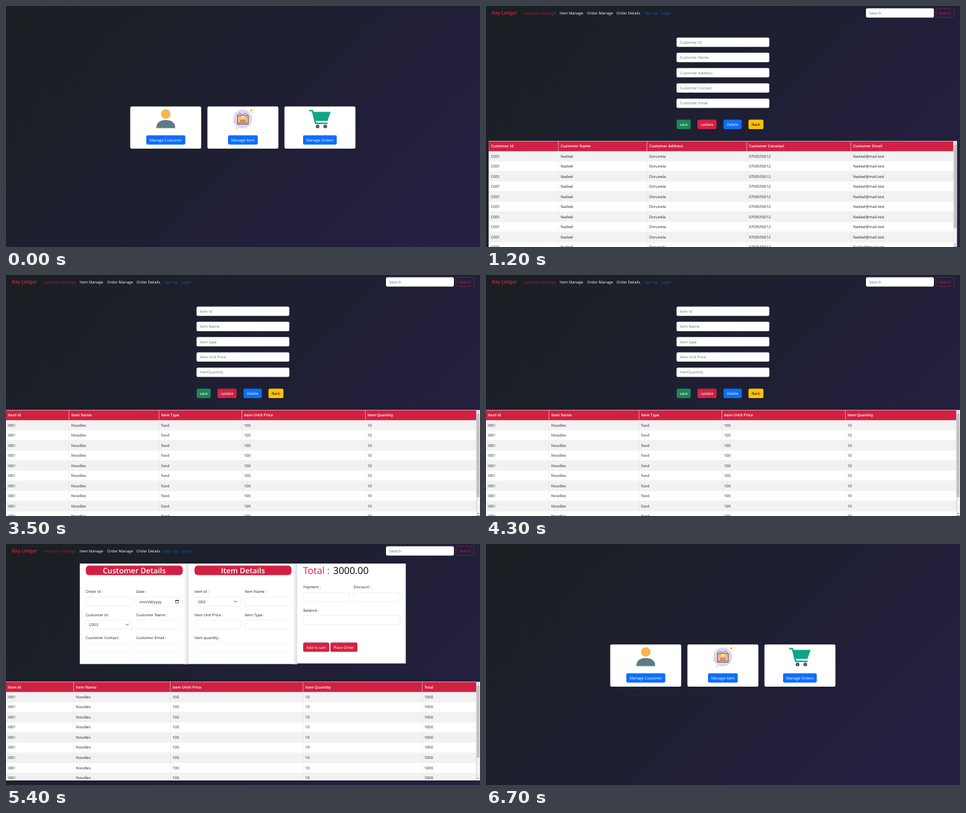
Write an HTML page that moves like this. It is 726x370 px and loops after 7.9 s.

```html
<!DOCTYPE html>
<html lang="en">
<head>
<meta charset="utf-8">
<title>Shop manager</title>
<style>
  html, body { margin: 0; width: 100%; height: 100%; overflow: hidden; }
  body { background: linear-gradient(135deg, #1a1f23 0%, #1c2029 25%, #1f1f35 55%, #261f43 100%); }
  svg { display: block; width: 726px; height: 370px; }
  text { font: 5.85px "Open Sans", "Noto Sans", sans-serif; text-rendering: geometricPrecision; white-space: pre; }
</style>
</head>
<body>
<svg id="stage" viewBox="0 0 726 370" xmlns="http://www.w3.org/2000/svg"></svg>
<script>
const LOOP = 7900;
const RED = '#d12143', BLUE = '#0d6efd', GREEN = '#198754', YELLOW = '#ffc107', GREY = '#6c757d', INK = '#212529';

const rect = (x, y, x2, y2, fill, r = 0, more = '') =>
  `<rect x="${x}" y="${y}" width="${x2 - x}" height="${y2 - y}" rx="${r}" fill="${fill}" ${more}/>`;
const text = (x, y, str, fill = INK, style = '') =>
  `<text x="${x}" y="${y}" fill="${fill}" style="${style}">${str}</text>`;
const path = (d, fill, more = '') => `<path d="${d}" fill="${fill}" ${more}/>`;
const line = (d, color, width) => path(d, 'none', `stroke="${color}" stroke-width="${width}" stroke-linecap="round" stroke-linejoin="round"`);
const dot = (x, y, r, fill) => `<circle cx="${x}" cy="${y}" r="${r}" fill="${fill}"/>`;
const group = (id, body) => `<g id="${id}">${body}</g>`;

function button(x, x2, y, label, fill, color = '#fff', id = '') {
  return rect(x, y, x2, y + 14.3, fill, 2.2, id && `id="${id}"`) +
    text((x + x2) / 2, y + 9.2, label, color, 'text-anchor:middle');
}

function home() {
  const cards = [190.3, 308.5, 426.5].map(x => rect(x, 154.2, x + 108.7, 219, '#fff', 2.2)).join('');
  const person = dot(244.7, 165.8, 7.3, '#f6b552') +
    path('M230.4 187.6V184.5C231.5 178 238 175 244.7 175S258 178 259 184.5V187.6Z', '#5d7c89');
  const parcel = dot(362.6, 173.6, 14.5, '#ddd7f4') +
    path('M354 169L357.5 164.5L362 167.5L367 164.3L371.5 169', '#fbe3c4', 'stroke="#4b3a44" stroke-width=".7"') +
    rect(354.4, 168, 371.2, 181.6, '#f2b983', .5, 'stroke="#4b3a44" stroke-width=".8"') +
    rect(360.8, 168.4, 364.8, 173, '#fbdcae') +
    rect(359.6, 175.4, 366, 179.2, '#e29b68', .3, 'stroke="#4b3a44" stroke-width=".5"') +
    line('M356 179.6H358.4M367.5 179.6H369.5', '#4b3a44', .6) +
    dot(375.6, 160.2, 1.7, '#f5b83d') + dot(377.6, 163.6, .8, '#f5b83d') +
    dot(349.4, 178.5, 1.1, '#f5b83d') + dot(353.2, 187.4, .7, '#5b4aa0') + dot(350, 163, .6, '#b9afe6');
  const cart = line('M465.3 160.7H469.4L474.2 180.2H491.6', '#10a587', 2.3) +
    path('M469.3 162.6H497.2L492.4 176.4H473Z', '#10a587') +
    [477.2, 489].map(x => dot(x, 184.9, 2.7, '#35434a') + dot(x, 184.9, .9, '#9aa5a8')).join('');
  return cards + person + parcel + cart +
    button(214.9, 274.6, 198.4, 'Manage Customer', BLUE, '#fff', 'hover') +
    button(340, 385.6, 198.4, 'Manage Item', BLUE) +
    button(455, 506.6, 198.4, 'Manage Orders', BLUE);
}

function nav() {
  const links = [[58, 'customer Manage', '#9c1e3d'], [113, 'Item Manage', '#fff'], [155, 'Order Manage', '#fff'],
    [200, 'Order Details', '#fff'], [242.3, 'Sign Up', '#1557cf'], [269, 'Login', '#1557cf']];
  return text(9, 13.2, 'Bay Ledger', '#dc2044', 'font-size:7.25px;font-weight:600') +
    links.map(([x, s, c]) => text(x, 12.8, s, c)).join('') +
    rect(582, 3.4, 686, 17.7, '#fff', 2.2) + text(587, 12.8, 'Search', GREY) +
    rect(689.2, 3.6, 716.8, 17.4, 'none', 2.2, 'stroke="#c92042" stroke-width=".5"') +
    text(703, 12.8, 'Search', '#c92042', 'text-anchor:middle');
}

function form(x, x2, fields, buttons) {
  return fields.map((s, i) => {
    const y = 48.4 + i * 23.45;
    return rect(x, y, x2, y + 14.3, '#fff', 2.2) + text(x + 4.9, y + 9.2, s, GREY);
  }).join('') + buttons.map(b => button(b[0], b[1], 174.6, ...b.slice(2))).join('');
}

// cols: [left edge, heading, cell]
function table({ id, x, x2, y, y2, thumb, cols }) {
  const pitch = 15.53, top = y + 15.6;
  let out = rect(x, y, x2, y2, '#fff');
  for (let i = 0; top + i * pitch < y2; i++) {
    const ry = top + i * pitch;
    out += rect(x, ry, x2, ry + pitch, i % 2 ? '#fff' : '#f1f2f1') +
      rect(x, ry + pitch - .4, x2, ry + pitch, '#dee2e6') +
      cols.map(c => text(c[0] + 3.3, ry + 9.6, c[2])).join('');
  }
  out += cols.slice(1).map(c => rect(c[0] - .2, top, c[0] + .2, y2, '#dee2e6')).join('');
  out += rect(x, y, x2, top, RED) + rect(x, y, x2, y + .5, '#e9dfe3') +
    cols.map((c, i) => (i ? rect(c[0] - .3, y, c[0] + .3, top, '#ecd5db') : '') +
      text(c[0] + 3.3, y + 9.9, c[1], '#fff', 'font-weight:600')).join('');
  const m = x2 + 2.8;
  out += rect(x2, y, x2 + 5.6, y2, '#f1f1f1') + rect(x2 + .7, y + 5.4, x2 + 4.9, thumb, '#c1c1c1') +
    path(`M${m - 1.3} ${y + 3.8}h2.6l-1.3 -1.5z`, '#8a8a8a') +
    path(`M${m - 1.3} ${y2 - 3.8}h2.6l-1.3 1.5z`, '#505050');
  return `<clipPath id="${id}">${rect(x, y, x2 + 5.6, y2, '#000')}</clipPath><g clip-path="url(#${id})">${out}</g>`;
}

function field(x, x2, y, label, value = '', icon = '') {
  const cy = y + 7;
  let out = text(x, y - 6.2, label) +
    rect(x, y, x2, y + 14, '#fff', 2.2, 'stroke="#dfe2e6" stroke-width=".5"') + text(x + 5, y + 9.2, value);
  if (icon === 'select') out += line(`M${x2 - 10} ${cy - 1}l2 2l2 -2`, '#343a40', .8);
  if (icon === 'date') out += rect(x2 - 10.8, cy - 2, x2 - 6.2, cy + 2.4, 'none', .3, 'stroke="#222" stroke-width=".6"') +
    rect(x2 - 11, cy - 2.4, x2 - 6, cy - 1, '#222');
  return out;
}

function orders() {
  const title = (x, s) => rect(x, 33.3, x + 148.5, 47.8, RED, 5) +
    text(x + 74.2, 44.9, s, '#fff', 'font-size:11.6px;font-weight:600;text-anchor:middle');
  const big = 'font-size:14.7px';
  return `<linearGradient id="shade"><stop stop-color="#fff"/><stop offset="1" stop-color="#dcdddd"/></linearGradient>` +
    rect(113, 30, 446, 184.3, '#fff') + rect(446, 30, 612.3, 183.4, '#fff') +
    rect(272.5, 30, 279.5, 184.3, 'url(#shade)') + rect(439, 30, 446, 184.3, 'url(#shade)') +
    title(122.2, 'Customer Details') + title(288.7, 'Item Details') +
    text(455, 46.2, 'Total :', RED, big) + text(501, 46.2, '3000.00', '#000', big) +
    field(122.3, 193.6, 81.4, 'Order Id :') + field(199.2, 270.5, 81.4, 'Date :', 'mm/dd/yyyy', 'date') +
    field(122.3, 193.6, 116.8, 'Customer Id :', 'C003', 'select') + field(199.2, 270.5, 116.8, 'Customer Name :') +
    field(122.3, 193.6, 152.2, 'Customer Contact :') + field(199.2, 270.5, 152.2, 'Customer Email :') +
    field(288.8, 359.6, 81.4, 'Item Id :', 'I003', 'select') + field(365.6, 436.9, 81.4, 'Item Name :') +
    field(288.8, 359.6, 116.8, 'Item Unit Price :') + field(365.6, 436.9, 116.8, 'Item Type :') +
    field(288.8, 436.9, 152.2, 'Item quantity :') +
    field(455.2, 526.2, 74.4, 'Payment :') + field(532.2, 603.5, 74.4, 'Discount :') +
    field(455.2, 603.5, 109.7, 'Balance :') +
    button(455.2, 495, 151.3, 'Add to cart', RED) + button(496.8, 538.2, 151.3, 'Place Order', RED) +
    table({ id: 'cart', x: 0, x2: 720.4, y: 211.6, y2: 363, thumb: 328, cols: [[-.3, 'Item Id', 'I001'],
      [103.8, 'Item Name', 'Noodles'], [251.6, 'Item Untit Price', '100'], [455, 'Item Quantity', '10'], [637.4, 'Total', '1000']] });
}

const crud = [[292, 313.5, 'save', GREEN], [323.8, 353.2, 'update', RED],
  [363.7, 391.7, 'Delete', BLUE], [402, 425, 'Back', YELLOW, '#000']];

const customers = () =>
  form(291.8, 434, ['Customer Id', 'Customer Name', 'Customer Address', 'Customer Contact', 'Customer Email'], crud) +
  table({ id: 'people', x: 4.2, x2: 715.8, y: 207.3, y2: 369.6, thumb: 341, cols: [[4.2, 'Customer Id', 'C001'],
    [110.9, 'Customer Name', 'Nadeel'], [246.7, 'Customer Address', 'Dorunela'],
    [399.4, 'Customer Conatact', '0700555012'], [558.9, 'Customer Email', 'Nadeel@mail.test']] });

const items = () =>
  form(291.8, 434, ['Item Id', 'Item Name', 'Item type', 'Item Unit Price', 'ItemQuantity'], crud) +
  table({ id: 'goods', x: 0, x2: 720.4, y: 207.3, y2: 369.6, thumb: 341, cols: [[-.3, 'Item Id', 'I001'],
    [96.6, 'Item Name', 'Noodles'], [234.2, 'Item Type', 'food'], [361.2, 'Item Untit Price', '100'],
    [550.2, 'Item Quantity', '10']] });

const details = () =>
  form(308, 417.8, ['Order Id', 'Item Id', 'Item Quantity', 'Total', 'Customer Email'],
    [[308, 337.2, 'update', RED], [347.7, 375.7, 'Delete', BLUE], [386, 408.6, 'Back', YELLOW, '#000']]) +
  table({ id: 'log', x: 4.2, x2: 715.8, y: 207.3, y2: 369.6, thumb: 316, cols: [[4.2, 'Order Id', 'O001'],
    [107, 'Item Id', 'I001'], [197, 'Item Name', 'Noodles'], [324.8, 'Item UnitPrice', '200'],
    [486.4, 'Item Quantity', '10'], [644, 'Total', '2000']] });

const scenes = { home, nav, customers, items, orders, details };
document.getElementById('stage').innerHTML =
  Object.entries(scenes).map(([id, draw]) => group(id, draw())).join('');

// steps: [time in ms, value], each held until the next
function play(id, prop, steps) {
  const frames = steps.map(([t, v]) => ({ offset: t / LOOP, [prop]: v, easing: 'steps(1, end)' }));
  frames.push({ offset: 1, [prop]: steps[steps.length - 1][1] });
  document.getElementById(id).animate(frames, { duration: LOOP, iterations: Infinity }).startTime = 0;
}

const between = (from, to) => [[0, 0], [from, 1], [to, 0]];
play('home', 'opacity', [[0, 1], [1200, 0], [6700, 1]]);
play('nav', 'opacity', between(1200, 6700));
play('customers', 'opacity', between(1200, 3200));
play('items', 'opacity', between(3200, 4500));
play('orders', 'opacity', between(4500, 5600));
play('details', 'opacity', between(5600, 6700));
play('hover', 'fill', [[0, BLUE], [700, '#0c66ea'], [800, '#0b5ed7'], [1200, BLUE]]);
</script>
</body>
</html>
```
